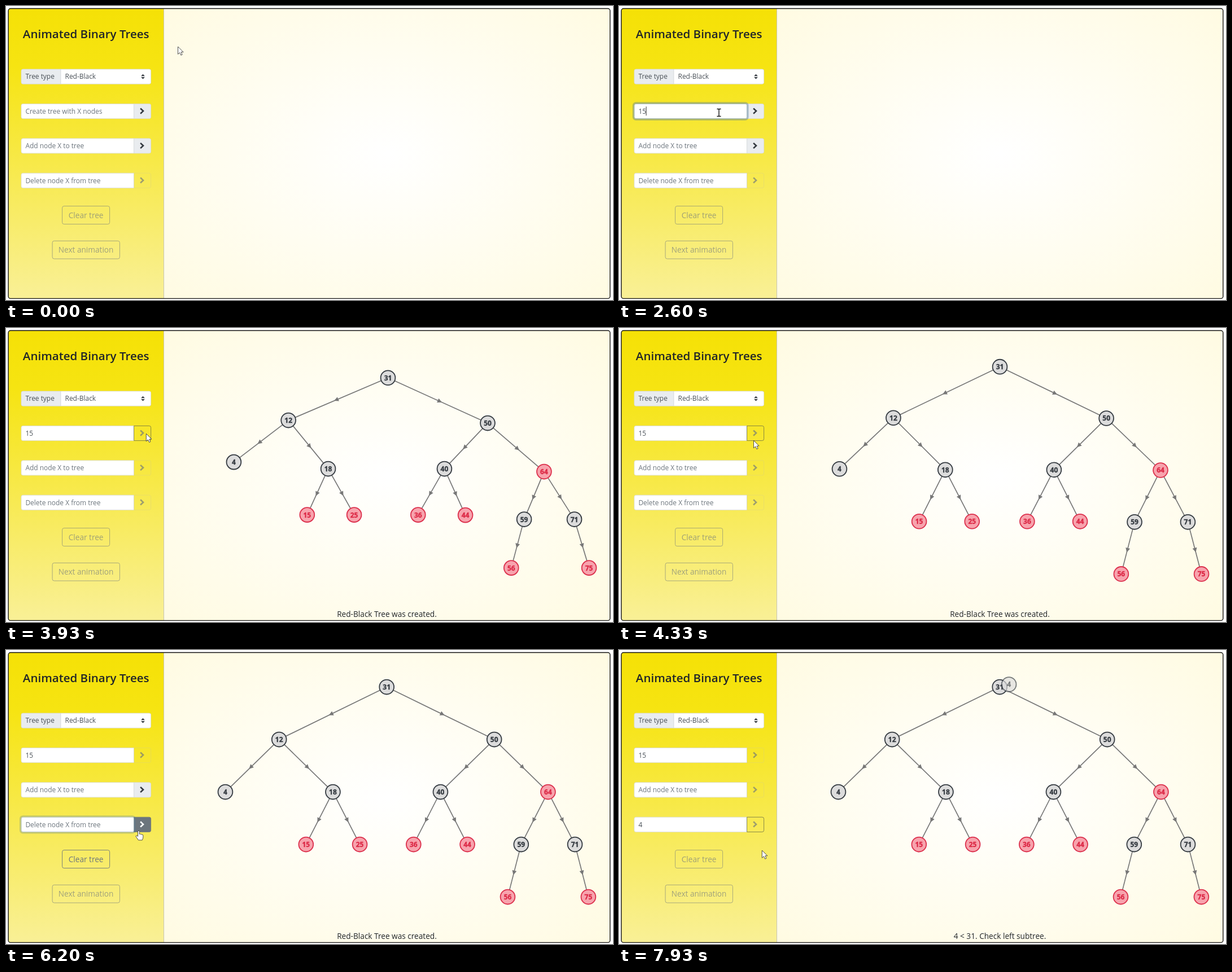
Write an HTML page that moves like this. It is 1075 px wide and 521 px high and loops after 8000 ms.

```html
<!DOCTYPE html>
<html lang="en">
<head>
<meta charset="utf-8">
<title>Animated Binary Trees</title>
<style>
  html, body { margin: 0; width: 100%; height: 100%; overflow: hidden; background: #fff; }
  svg { display: block; width: 1075px; height: 521px; }
  text { font: 11.95px "Open Sans", "Noto Sans", sans-serif; fill: #495057; }
  .title { font-size: 20.5px; font-weight: 600; fill: #212529; text-anchor: middle; }
  .message { font-size: 13.65px; fill: #212529; text-anchor: middle; }
  .hint { fill: #6c757d; }
  .field { fill: #fff; stroke: #d6dadc; stroke-width: .8; }
  .addon { fill: #e9ecef; stroke: #d6dadc; stroke-width: .8; }
  .chevron { fill: none; stroke: #343a40; stroke-width: 2.6; }
  .hover .addon { fill: #6c757d; stroke: #6c757d; }
  .hover .chevron { stroke: #fff; }
  .off .addon { fill: none; stroke: #cfca8e; stroke-opacity: .45; }
  .off .chevron { stroke: #6c757d; stroke-opacity: .65; }
  .pressed .addon { stroke: #6c6f45; stroke-opacity: 1; }
  .ring { fill: none; stroke: #52799a; stroke-opacity: .42; stroke-width: 2.7; }
  .edge-line { fill: none; stroke: #9db4ba; }
  .caret { stroke: #333; stroke-width: 1; }
  .button rect { fill: none; stroke: #6c757d; stroke-width: .9; }
  .button text { font-size: 13.65px; fill: #6c757d; text-anchor: middle; }
  .button.off { opacity: .63; }
  .link { stroke: #777; stroke-width: 1.7; }
  .arrow { fill: #777; }
  .node circle { fill: #dcdcdc; stroke: #343a40; stroke-width: 1.8; }
  .node text { font-size: 12px; font-weight: 700; text-anchor: middle; fill: #343a40; stroke: #343a40; stroke-width: .35; }
  .node.red circle { fill: #f7a3ad; stroke: #dc2f4b; }
  .node.red text { fill: #dc2845; stroke: #dc2845; }
  .pointer { fill: #fff; stroke: #333; stroke-width: .85; stroke-linejoin: round; }
  .beam { fill: none; stroke: #111; stroke-width: 1.4; }
</style>
</head>
<body>
<svg id="stage" viewBox="0 0 1075 521">
  <defs>
    <linearGradient id="side" x2="0" y2="1">
      <stop offset="0" stop-color="#f5e106"/>
      <stop offset=".2" stop-color="#f6e412"/>
      <stop offset="1" stop-color="#f9f097"/>
    </linearGradient>
    <radialGradient id="glow" r=".707">
      <stop offset="0" stop-color="#fff"/>
      <stop offset="1" stop-color="#fffbe2"/>
    </radialGradient>
    <clipPath id="frame"><rect x="4.1" y="4.5" width="1065.7" height="513.9" rx="4"/></clipPath>
  </defs>
  <g clip-path="url(#frame)">
    <rect x="279" y="4" width="792" height="516" fill="url(#glow)"/>
    <rect x="4" y="4" width="275" height="516" fill="url(#side)"/>
    <rect x="279" y="4" width="1" height="516" fill="#c8c6b4"/>
  </g>
  <rect x="4.1" y="4.5" width="1065.7" height="513.9" rx="4" fill="none" stroke="#111" stroke-width="1.4"/>

  <text class="title" x="141.7" y="57.4">Animated Binary Trees</text>
  <path class="addon" d="M97 112H30a3 3 0 0 0-3 3v20.2a3 3 0 0 0 3 3h67z"/>
  <path class="field" d="M97 112h156.6a3 3 0 0 1 3 3v20.2a3 3 0 0 1-3 3H97z"/>
  <text x="34.5" y="129.4">Tree type</text>
  <text x="104.5" y="129.4">Red-Black</text>
  <path d="M242.5 120.8l3.4 3.4h-6.8zm0 8.6l3.4-3.4h-6.8z" fill="#343a40"/>

  <g id="rows"></g>
  <g id="clear" class="button">
    <rect x="99.6" y="354.6" width="84" height="32" rx="3.2"/>
    <text x="141.6" y="375.7">Clear tree</text>
  </g>
  <g class="button off">
    <rect x="82.1" y="416.3" width="119.3" height="31.7" rx="3.2"/>
    <text x="141.6" y="437.2">Next animation</text>
  </g>

  <g id="tree"></g>
  <text id="message" class="message" x="674.5" y="512"></text>

  <g id="cursor">
    <path id="arrow" class="pointer" d="M0 0V13.4L3.2 10.6L5.3 15.2L7.6 14.2L5.6 9.7H9.6Z"/>
    <path id="beam" class="beam" d="M-3.5-6.5H-1Q0-6.5 0-5.5Q0-6.5 1-6.5H3.5M0-5.5V5.5M-3.5 6.5H-1Q0 6.5 0 5.5Q0 6.5 1 6.5H3.5"/>
    <path id="hand" class="pointer" d="M-1.5 1Q-1.3 0 0 0Q1.2 0 1.3 1.2V6Q2.6 5 3.7 6.4Q5 5.6 5.9 7Q7.6 6.5 7.8 8.2V11.5Q7.6 14 6.2 16.6H-.6Q-2.2 13.6-4.6 10.9Q-5.6 9-3.8 8.6Q-2.6 8.7-1.5 10Z"/>
  </g>
</svg>

<script>
const LOOP = 8000, STEP = 1000 / 15;
const CREATE = 3500, READY = 5580, REMOVE = 7450;
const $ = id => document.getElementById(id);

function add(parent, tag, attrs = {}, text = '') {
  const el = document.createElementNS('http://www.w3.org/2000/svg', tag);
  for (const key in attrs) el.setAttribute(key, attrs[key]);
  el.textContent = text;
  return parent.appendChild(el);
}
const clamp = v => Math.max(0, Math.min(1, v));
const smooth = v => { v = clamp(v); return v * v * (3 - 2 * v); };
const mix = (a, b, k) => a + (b - a) * k;
const within = (t, a, b) => t >= a && t < b;
const show = (el, on) => { el.style.display = on ? '' : 'none'; };

// Sidebar input rows
function makeRow(hint, i) {
  const y = 173.4 + 61.4 * i;
  const g = add($('rows'), 'g');
  add(g, 'path', { class: 'field', d: `M226.5 ${y}H30a3 3 0 0 0-3 3v20.2a3 3 0 0 0 3 3h196.5z` });
  add(g, 'path', { class: 'addon', d: `M226.5 ${y}h27.1a3 3 0 0 1 3 3v20.2a3 3 0 0 1-3 3h-27.1z` });
  add(g, 'path', { class: 'chevron', d: `M238.1 ${y + 8.1}l4.9 4.6l-4.9 4.6` });
  const label = add(g, 'text', { x: 34.4, y: y + 17.3 });
  const focus = add(g, 'g');
  add(focus, 'rect', { class: 'ring', x: 25.3, y: y - 1.7, width: 203, height: 29.6, rx: 4.5 });
  add(focus, 'rect', { class: 'edge-line', x: 27, y, width: 199.7, height: 26.2, rx: 3 });
  const caret = add(g, 'path', { class: 'caret' });
  return { g, y, hint, label, focus, caret };
}
const rows = ['Create tree with X nodes', 'Add node X to tree', 'Delete node X from tree'].map(makeRow);

function drawRow(row, s, pos) {
  const over = s.enabled && pos.x > 226 && pos.x < 257 && within(pos.y, row.y, row.y + 26.5);
  row.g.setAttribute('class', !s.enabled ? (s.pressed ? 'off pressed' : 'off') : over ? 'hover' : '');
  row.label.textContent = s.value || row.hint;
  row.label.setAttribute('class', s.value ? '' : 'hint');
  row.focus.style.opacity = s.focus || 0;
  show(row.caret, s.caret);
  row.caret.setAttribute('d', `M${34.5 + 6.83 * s.value.length} ${row.y + 4.8}v16`);
  return over;
}

// Tree: value, parent, side, red, and the remaining offset at SETTLE
const SETTLE = 3933, TAU = 200;
const nodes = [
  [31, -1, 0, 0, 2.3, 22.7], [12, 0, -1, 0, 16.5, 5], [50, 0, 1, 0, -11.7, 10],
  [4, 1, -1, 0, 15, -14], [18, 1, 1, 0, -8.4, -2], [40, 2, -1, 0, 7, -2],
  [64, 2, 1, 1, -7, 3], [15, 4, -1, 1, 2, -13.5], [25, 4, 1, 1, -10, -13.5],
  [36, 5, -1, 1, 8, -13.5], [44, 5, 1, 1, -3.5, -13], [59, 6, -1, 0, 5.3, -5.5],
  [71, 6, 1, 0, -1, -5.5], [56, 11, -1, 1, 6.3, -12.5], [75, 12, 1, 1, 1.2, -12.5]
].map(([value, parent, side, red, dx, dy]) => ({ value, parent, side, red, dx, dy }));

function makeNode(value, red) {
  const g = add($('tree'), 'g', { class: red ? 'node red' : 'node' });
  add(g, 'circle', { r: 12.9 });
  add(g, 'text', { y: 4.4 }, value);
  return g;
}
nodes.forEach((n, i) => {
  const up = nodes[n.parent];
  n.depth = up ? up.depth + 1 : 0;
  n.endX = up ? up.endX + n.side * 381 / 2 ** n.depth : 674.2;
  n.endY = 65.6 + 93 * n.depth;
  const r = 10 * Math.sqrt(i + .5), a = i * 2.4;
  n.startX = 674.2 + r * Math.cos(a);
  n.startY = 262 + r * Math.sin(a);
  if (up) {
    n.link = add($('tree'), 'line', { class: 'link' });
    n.arrow = add($('tree'), 'path', { class: 'arrow', d: 'M0-4L8 0L0 4Z' });
  }
});
nodes.forEach(n => { n.g = makeNode(n.value, n.red); });
const ghost = makeNode(4, 0);
ghost.setAttribute('transform', 'translate(690.6 61)');

function drawTree(t) {
  show($('tree'), t >= CREATE);
  if (t < CREATE) return;
  const rest = Math.exp((SETTLE - t) / TAU), spread = smooth((t - CREATE) / 330);
  for (const n of nodes) {
    n.x = mix(n.startX, n.endX + n.dx * rest, spread);
    n.y = mix(n.startY, n.endY + n.dy * rest, spread);
    n.g.setAttribute('transform', `translate(${n.x} ${n.y})`);
    const up = nodes[n.parent];
    if (!up) continue;
    const ends = { x1: up.x, y1: up.y, x2: n.x, y2: n.y };
    for (const key in ends) n.link.setAttribute(key, ends[key]);
    const angle = Math.atan2(n.y - up.y, n.x - up.x) * 180 / Math.PI;
    n.arrow.setAttribute('transform',
      `translate(${(n.x + up.x) / 2} ${(n.y + up.y) / 2}) rotate(${angle})`);
  }
  ghost.style.opacity = clamp((t - 7630) / 450);
}

// Mouse path: time, x, y
const path = [
  [670, 304.5, 72], [1133, 176, 186], [1333, 176, 186], [1400, 177, 189],
  [3070, 177, 189], [3400, 243, 186], [3800, 248.3, 187.3], [3933, 248.3, 187.3],
  [4333, 238.5, 199.3], [5267, 131.7, 292.3], [5600, 150, 309], [5733, 150, 309],
  [6133, 235, 320.3], [7400, 235, 320.3], [7933, 253.3, 355]
];
function mouseAt(t) {
  const i = path.findIndex(p => p[0] > t);
  if (i < 1) { const p = path[i < 0 ? path.length - 1 : 0]; return { x: p[1], y: p[2] }; }
  const a = path[i - 1], b = path[i], k = smooth((t - a[0]) / (b[0] - a[0]));
  return { x: mix(a[1], b[1], k), y: mix(a[2], b[2], k) };
}

function draw(t) {
  const pos = mouseAt(t);
  const ready = within(t, READY, REMOVE);
  const fade = (from, to) => clamp((t - from) / 150) * (1 - clamp((t - to) / 150));
  const states = [
    { enabled: t < CREATE, pressed: t < 4800, focus: fade(1280, CREATE),
      value: t < 2120 ? '' : t < 2590 ? '1' : '15',
      caret: within(t, 1320, 1790) || within(t, 2120, 3120) },
    { enabled: t < CREATE || ready, value: '' },
    { enabled: ready, pressed: t >= REMOVE, focus: .7 * fade(5680, REMOVE),
      value: t < 6720 ? '' : '4',
      caret: within(t, 5720, 6190) || within(t, 6720, 7390) }
  ];
  const overs = rows.map((row, i) => drawRow(row, states[i], pos));
  $('clear').setAttribute('class', ready ? 'button' : 'button off');

  drawTree(t);
  $('message').textContent = t < CREATE ? '' :
    t < 7590 ? 'Red-Black Tree was created.' : '4 < 31. Check left subtree.';

  const hand = overs.includes(true);
  const beam = within(pos.x, 27, 226) && rows.some(r => within(pos.y, r.y, r.y + 26));
  show($('hand'), hand);
  show($('beam'), beam);
  show($('arrow'), !hand && !beam);
  $('cursor').setAttribute('transform', `translate(${pos.x} ${pos.y})`);
}

const begin = performance.now();
function tick() {
  const t = (performance.now() - begin) % LOOP;
  draw(Math.floor((t + 4) / STEP) * STEP % LOOP);
  requestAnimationFrame(tick);
}
tick();
</script>
</body>
</html>
```
